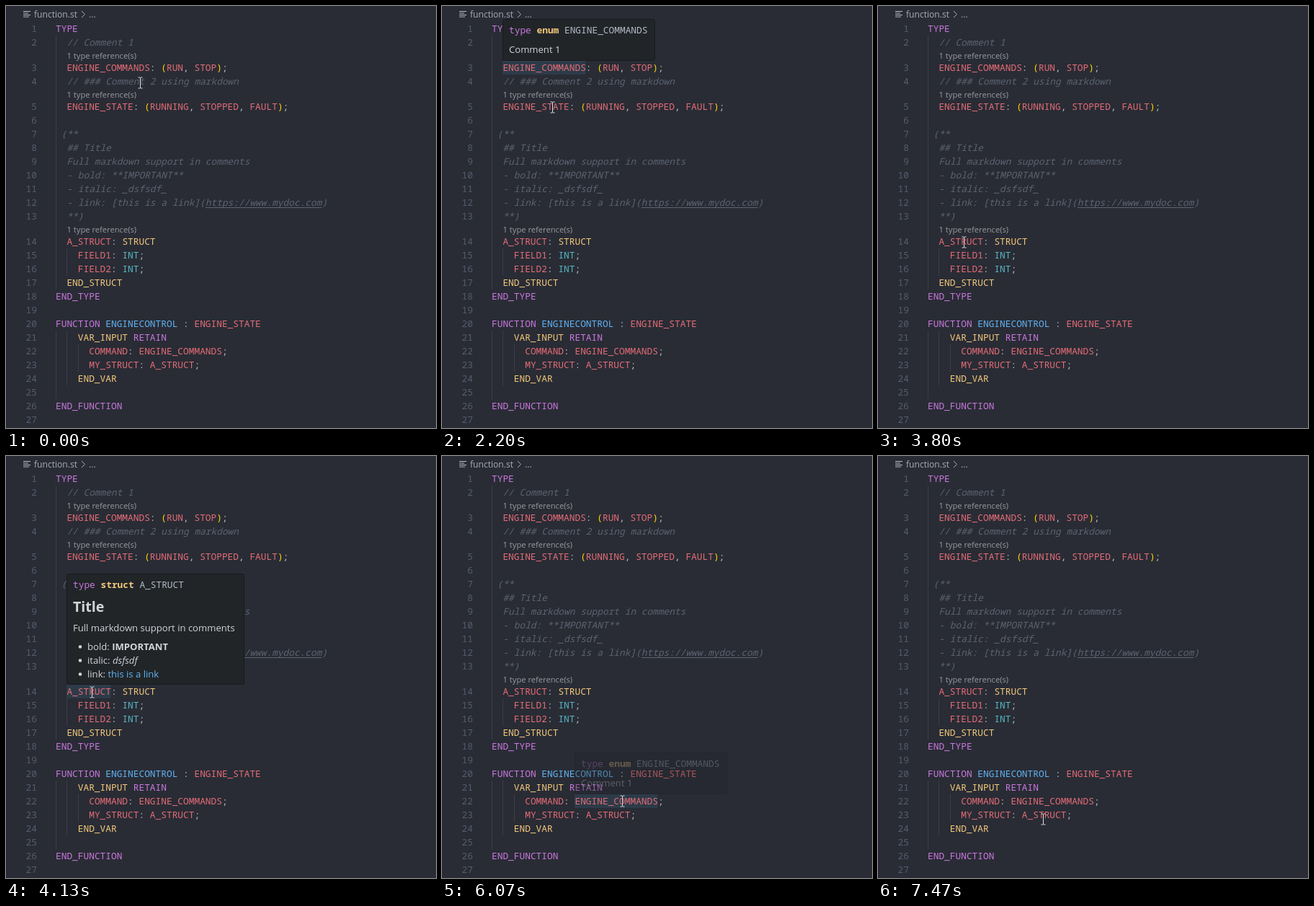
An HTML page that plays this animation: 597 by 585 pixels, repeating every 8000 ms.

```html
<!DOCTYPE html>
<html lang="en">
<head>
<meta charset="utf-8">
<title>Hover documentation</title>
<style>
  html, body { margin: 0; width: 100%; height: 100%; overflow: hidden; background: #292c35; }
  svg { display: block; }
  text { white-space: pre; font: 12.83px "Noto Sans Mono", monospace; fill: #b4bac6; }
  .ui { font-family: "Open Sans", sans-serif; }
</style>
</head>
<body>
<svg id="stage" width="597" height="585" viewBox="0 0 597 585"></svg>
<script>
const SOURCE = `TYPE
  // Comment 1
@1 type reference(s)
  ENGINE_COMMANDS: (RUN, STOP);
  // ### Comment 2 using markdown
@1 type reference(s)
  ENGINE_STATE: (RUNNING, STOPPED, FAULT);

 (**
  ## Title
  Full markdown support in comments
  - bold: **IMPORTANT**
  - italic: _dsfsdf_
  - link: [this is a link](https://www.mydoc.com)
  **)
@1 type reference(s)
  A_STRUCT: STRUCT
    FIELD1: INT;
    FIELD2: INT;
  END_STRUCT
END_TYPE

FUNCTION ENGINECONTROL : ENGINE_STATE
    VAR_INPUT RETAIN
      COMMAND: ENGINE_COMMANDS;
      MY_STRUCT: A_STRUCT;
    END_VAR

END_FUNCTION
`;
const LEFT = 69, CHAR = 7.698, LINE = 19, LENS = 16, TICK = 1000 / 15, LOOP = 8000;
const COLOR = { red: '#e46c76', purple: '#ca78de', yellow: '#f3c87b', blue: '#61b3f3',
  cyan: '#56b6c2', gold: '#ffd700', comment: '#5c6370', plain: '#b4bac6', doc: '#d2d4d8' };
const KEYWORDS = {
  purple: 'TYPE END_TYPE FUNCTION END_FUNCTION RETAIN',
  yellow: 'STRUCT END_STRUCT VAR_INPUT END_VAR',
  blue: 'ENGINECONTROL', cyan: 'INT'
};
const wordColor = {};
for (const [name, words] of Object.entries(KEYWORDS))
  for (const word of words.split(' ')) wordColor[word] = COLOR[name];

const stage = document.getElementById('stage');

function add(parent, tag, attrs, content = '') {
  const node = document.createElementNS('http://www.w3.org/2000/svg', tag);
  for (const key in attrs) node.setAttribute(key, attrs[key]);
  node.textContent = content;
  return parent.appendChild(node);
}
const rect = (parent, x, y, width, height, fill) => add(parent, 'rect', { x, y, width, height, fill });
const code = (parent, x, y, content, fill, style = '') =>
  add(parent, 'text', { x, y, style: `fill:${fill};${style}` }, content);
const label = (parent, x, y, size, content, fill, style = '') =>
  add(parent, 'text', { x, y, class: 'ui', style: `font-size:${size}px;fill:${fill};${style}` }, content);

rect(stage, 0, 0, 1, 585, '#22252d');
const highlights = add(stage, 'g', {});

// Breadcrumb
add(stage, 'path', { d: 'M24 7.5h10M24 10h7M24 12.5h10M24 15h8', stroke: '#b9bcc3', 'stroke-width': 1.2 });
label(stage, 39, 16, 12.1, 'function.st', '#a9adb6');
add(stage, 'path', { d: 'M105 7l4.5 4.5-4.5 4.5', stroke: '#a9adb6', fill: 'none' });
label(stage, 115, 16, 12.1, '...', '#a9adb6');

// Indent guides: x, y, height
for (const [x, y, height] of [[69, 41, 352], [84, 336, 38], [69, 450, 95], [84, 450, 76], [100, 469, 38]])
  rect(stage, x, y, 1, height, '#3a3e48');

function drawComment(line, baseline) {
  const url = line.indexOf('https'), end = line.lastIndexOf(')');
  const indent = line.search(/\S/);
  code(stage, LEFT + indent * CHAR, baseline, line.trim(), COLOR.comment, 'font-style:italic');
  if (url > 0) rect(stage, LEFT + url * CHAR, baseline + 2, (end - url) * CHAR, 1, COLOR.comment);
}

function drawCode(line, baseline) {
  for (const { 0: token, index } of line.matchAll(/\w+|[^\w\s]/g)) {
    const fill = /\w/.test(token) ? wordColor[token] || COLOR.red
      : /[()]/.test(token) ? COLOR.gold : COLOR.plain;
    code(stage, LEFT + index * CHAR, baseline, token, fill);
  }
}

let lineTop = 22, lineNumber = 0;
for (const line of SOURCE.split('\n')) {
  if (line[0] === '@') {
    label(stage, 84.5, lineTop + 13, 11.2, line.slice(1), '#989a9f');
    lineTop += LENS;
    continue;
  }
  lineNumber++;
  code(stage, 43, lineTop + 14, lineNumber, '#565c6e', 'text-anchor:end');
  const isComment = line.includes('//') || (lineNumber >= 7 && lineNumber <= 13);
  (isComment ? drawComment : drawCode)(line, lineTop + 14);
  lineTop += LINE;
}

// Hover popups sit directly above the highlighted word.
function makeHover({ x, y, width, height, kind, name, body, start, end, fade }) {
  const mark = rect(highlights, x, y + height, name.length * CHAR, LINE, '#2d3b49');
  const box = add(stage, 'g', { transform: `translate(${x} ${y})` });
  add(box, 'rect', { x: .5, y: .5, width: width - 1, height: height - 1, rx: 2, fill: '#212528', stroke: '#181a1f' });
  code(box, 9, 19.5, 'type', COLOR.purple);
  code(box, 9 + 5 * CHAR, 19.5, kind, COLOR.yellow, 'font-weight:bold');
  code(box, 9 + (6 + kind.length) * CHAR, 19.5, name, COLOR.plain);
  body(box);
  return { mark, box, start, end, fade };
}
const doc = (box, x, y, content, style, size = 13.1) => label(box, x, y, size, content, COLOR.doc, style);
const firstComment = box => doc(box, 9, 47, 'Comment 1');

function structDoc(box) {
  doc(box, 9, 53, 'Title', 'font-weight:bold', 19.6);
  doc(box, 9, 80, 'Full markdown support in comments');
  const items = [
    ['bold: ', 'IMPORTANT', 'font-weight:bold'],
    ['italic: ', 'dsfsdf', 'font-style:italic'],
    ['link: ', 'this is a link', 'fill:' + COLOR.blue]
  ];
  items.forEach(([lead, content, style], i) => {
    const y = 106 + i * LINE;
    add(box, 'circle', { cx: 19, cy: y - 4.5, r: 2.3, fill: COLOR.doc });
    add(doc(box, 29, y, lead), 'tspan', { style }, content);
  });
}

// start and end count ticks of the 15 per second clock
const hovers = [
  { x: 84, y: 18, width: 212, height: 58, kind: 'enum', name: 'ENGINE_COMMANDS',
    body: firstComment, start: 20, end: 36, fade: [1] },
  { x: 84, y: 65, width: 243, height: 65, kind: 'enum', name: 'ENGINE_STATE',
    body: box => doc(box, 9, 48, 'Comment 2 using markdown', 'font-weight:bold', 15.4),
    start: 42, end: 54, fade: [.5, 1] },
  { x: 84, y: 163, width: 247, height: 154, kind: 'struct', name: 'A_STRUCT',
    body: structDoc, start: 61, end: 78, fade: [.5, 1] },
  { x: 184, y: 411, width: 212, height: 58, kind: 'enum', name: 'ENGINE_COMMANDS',
    body: firstComment, start: 91, end: 105, fade: [.3, .8, 1] }
].map(makeHover);

const pointer = add(stage, 'g', {});
const beam = 'M-3 -7.5h2.5l.5 .5l.5 -.5h2.5M0 -7V7M-3 7.5h2.5l.5 -.5l.5 .5h2.5';
add(pointer, 'path', { d: beam, fill: 'none', stroke: '#1c1e24', 'stroke-width': 2, opacity: .5 });
add(pointer, 'path', { d: beam, fill: 'none', stroke: '#e4e4e6' });

// Pointer path: tick, x, y
const PATH = [
  [0, 186.5, 106.5], [4, 160.5, 88], [15, 160.5, 88], [16, 217.5, 54], [17, 158.5, 87.5],
  [26, 158.5, 87.5], [33, 153.5, 140.5], [48, 153.5, 140.5], [57, 119.5, 327.5],
  [73, 119.5, 327.5], [79, 291.5, 426.5], [84, 250.5, 478.5], [98, 250.5, 478.5],
  [103, 258.5, 521.5], [110, 231.5, 504.5], [111, 231.5, 504.5], [112, 229.5, 503.5], [121, 229.5, 503.5]
];

function pointerAt(tick) {
  const next = PATH.findIndex(([at]) => at > tick);
  const [t0, x0, y0] = PATH[next - 1], [t1, x1, y1] = PATH[next];
  const p = (tick - t0) / (t1 - t0);
  const snap = v => Math.floor(v) + .5;
  return [snap(x0 + (x1 - x0) * p), snap(y0 + (y1 - y0) * p)];
}

function render(now) {
  const tick = Math.min(119, Math.floor((now % LOOP + 4) / TICK));
  pointer.setAttribute('transform', `translate(${pointerAt(tick)})`);
  for (const { mark, box, start, end, fade } of hovers) {
    const visible = tick >= start && tick < end;
    mark.setAttribute('opacity', visible ? 1 : 0);
    box.setAttribute('opacity', visible ? fade[Math.min(tick - start, fade.length - 1)] : 0);
  }
}

const began = performance.now();
function loop() {
  render(performance.now() - began);
  requestAnimationFrame(loop);
}
loop();
</script>
</body>
</html>
```
